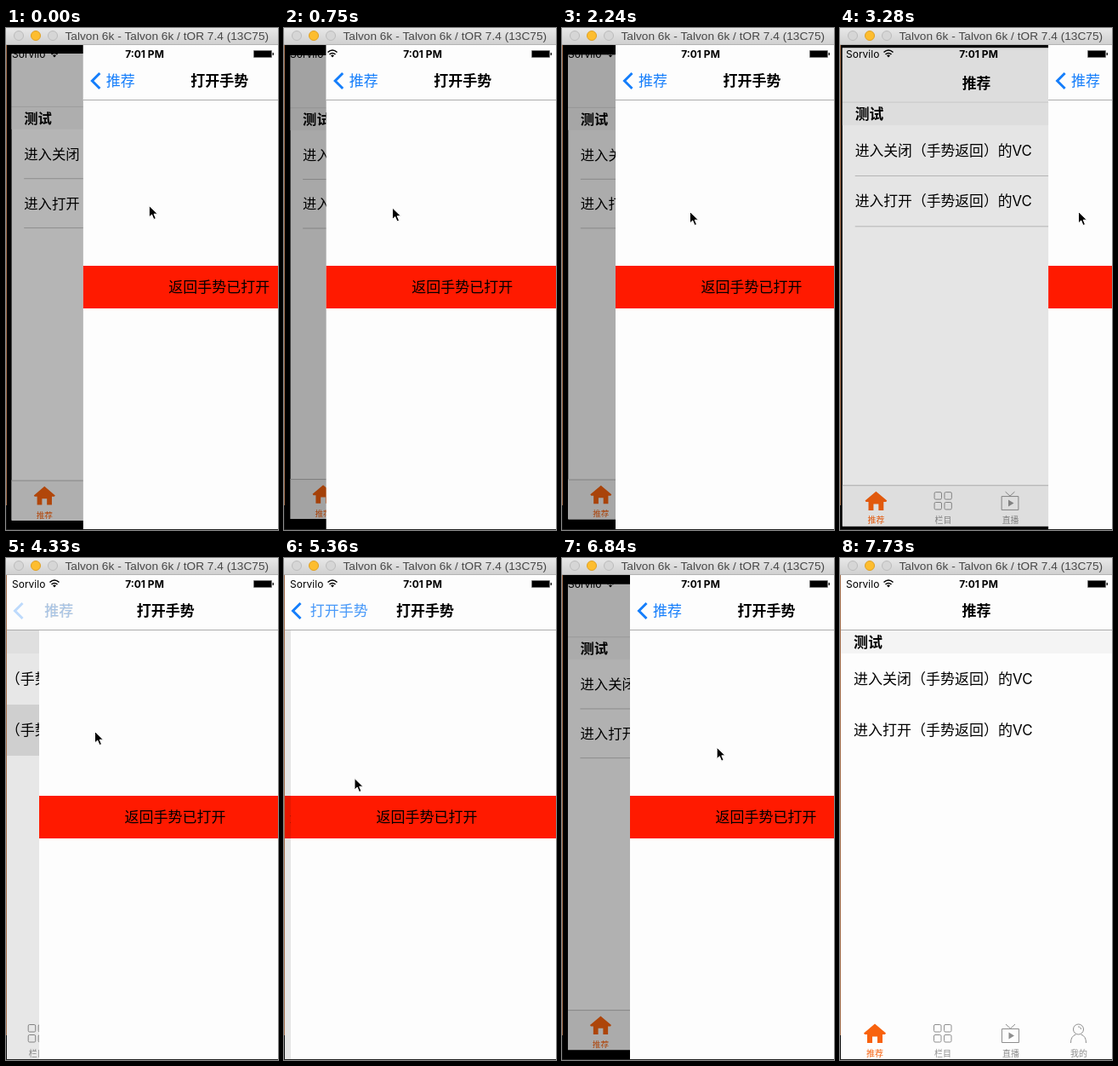
Animation of 320 by 589 pixels, one loop 8160 ms. Source, as an HTML page with a canvas:

```html
<!DOCTYPE html>
<html lang="zh">
<head>
<meta charset="utf-8">
<style>
  html, body { margin: 0; width: 100%; height: 100%; overflow: hidden; background: #fff; }
  canvas { display: block; }
</style>
</head>
<body>
<canvas width="320" height="589"></canvas>
<script>
const c = document.querySelector('canvas').getContext('2d');
const LOOP = 8160, STEP = 148.8, WIDTH = 320;
const BLUE = '#157efb', ORANGE = '#f8620e', GREY = '#8e8e8e', PAPER = '#fdfdfd';
const UI = 'Inter, "Noto Sans CJK SC", "Noto Sans CJK JP", sans-serif';
const TITLE = '"Liberation Sans", sans-serif';

const home = { title: '推荐' };
const detail = { title: '打开手势', back: '推荐' };
const nested = { title: '打开手势', back: '打开手势' };

// Motion, with time k counted in steps
const mix = (a, b, u) => a + (b - a) * u;
const ramp = (k, from, to) => Math.min(1, Math.max(0, (k - from) / (to - from)));
const wander = k => 74.7 + 25.7 * Math.cos(0.4957 * k - 5.392);
const settle = k => Math.round(200 * 0.195 ** k);

const scenes = [
  { until: 28, draw: drag, pages: [home, detail], x: k => mix(wander(k), WIDTH, ramp(k, 15, 23) ** 3) },
  { until: 34, draw: push, pages: [home, detail], x: k => settle(k - 28) },
  { until: 37, draw: push, pages: [detail, nested], x: k => settle(k - 34) },
  { until: 43, draw: drag, pages: [detail, nested], x: k => WIDTH * ramp(k, 37, 42) ** 1.87 },
  { until: 55, draw: drag, pages: [home, detail], x: k => WIDTH * ramp(k, 43, 49) ** 2 }
];

// Places the pointer passes after it stops following the wandering page
const stops = [
  { k: 15, x: 150, y: 215 }, { k: 22, x: 280, y: 215 }, { k: 26, x: 104, y: 203 },
  { k: 29, x: 104, y: 203 }, { k: 32, x: 135, y: 300 }, { k: 35, x: 135, y: 300 },
  { k: 37, x: 30, y: 216 }, { k: 41, x: 161, y: 213 }, { k: 44, x: 35, y: 215 },
  { k: 47, x: 255, y: 225 }, { k: 52, x: 276, y: 690 }
];

function pointerAt(k) {
  if (k < 15) return [wander(k) + 77 + 10 * (k / 15) ** 3, 208 + k / 2];
  const next = stops.findIndex(stop => stop.k > k);
  const b = stops.at(next), a = next < 0 ? b : stops[next - 1];
  const u = a === b ? 1 : ramp(k, a.k, b.k);
  return [mix(a.x, b.x, u), mix(a.y, b.y, u)];
}

// Drawing helpers
function box(x, y, w, h, color) {
  c.fillStyle = color;
  c.fillRect(x, y, w, h);
}

function text(str, x, midY, size, { color = '#000', weight = 400, align = 'left', font = UI } = {}) {
  c.font = `${weight} ${size}px ${font}`;
  c.textAlign = align;
  c.fillStyle = color;
  c.fillText(str, x, midY + size * 0.37);
}

function shape(d, color, width) {
  const path = new Path2D(d);
  c.fillStyle = c.strokeStyle = color;
  c.lineWidth = width || 1;
  if (width) c.stroke(path);
  else c.fill(path);
}

function dot(x, y, r, fill, stroke) {
  c.beginPath();
  c.arc(x, y, r, 0, 7);
  c.fillStyle = fill;
  c.fill();
  c.strokeStyle = stroke;
  c.lineWidth = 1;
  c.stroke();
}

function group(draw) {
  c.save();
  draw();
  c.restore();
}

const withAlpha = (alpha, draw) => group(() => { c.globalAlpha = alpha; draw(); });
const shifted = (x, y, draw) => group(() => { c.translate(x, y); draw(); });

// Pages
const navTitle = (str, x = 160.5) => text(str, x, 62, 17, { weight: 700, align: 'center' });
const chevron = () => shape('M19.5 53L10.5 62L19.5 71', BLUE, 3);

function navBar(page, shaded) {
  box(0, 20, WIDTH, 64, shaded ? '#f4f4f4' : PAPER);
  box(0, 84, WIDTH, 1, shaded ? '#d8d8d8' : '#acacac');
  navTitle(page.title);
  if (page.back) {
    chevron();
    text(page.back, 27, 62, 17, { color: BLUE });
  }
}

function gridIcon() {
  for (const x of [110.5, 122.5]) for (const y of [547.5, 559.5]) {
    c.beginPath();
    c.roundRect(x, y, 8.5, 8.5, 1.5);
    c.strokeStyle = GREY;
    c.lineWidth = 1;
    c.stroke();
  }
}

const tabIcons = [
  () => shape('M41 546.5L54 557.5L53 559H50V569H44V561.5H38V569H32V559H29L28 557.5Z', ORANGE),
  gridIcon,
  () => {
    shape('M190.5 552.5h20v16h-20zM195 547L200.5 552L206 547', GREY, 1);
    shape('M198.5 556.5L205 560.5L198.5 564.5Z', GREY);
  },
  () => shape('M286.5 553a6 6 0 1 1-12 0a6 6 0 1 1 12 0zM280 550a3 3 0 0 1 3.5 3' +
    'M271.5 569q0-8 6-10M289.5 569q0-8-6-10', GREY, 1)
];

function homeBody(shaded, pressed) {
  box(0, 85, WIDTH, 27, '#f4f4f4');
  text('测试', 16, 98.5, 17, { weight: 700 });
  if (pressed) box(0, 172, WIDTH, 60, '#e3e3e3');
  ['关闭', '打开'].forEach((word, i) => {
    text(`进入${word}（手势返回）的VC`, 16, 142 + i * 60, 17);
    if (shaded) box(16, 171.5 + i * 60, 304, 1, '#c6c6c6');
  });
  if (shaded) {
    box(0, 539, WIDTH, 49, '#f5f5f5');
    box(0, 539, WIDTH, 1, '#bdbdbd');
  }
  ['推荐', '栏目', '直播', '我的'].forEach((label, i) => {
    tabIcons[i]();
    text(label, 41 + i * 80, 581, 10, { color: i ? GREY : ORANGE, align: 'center' });
  });
}

function detailBody() {
  box(0, 279, WIDTH, 50, '#ff1a00');
  text('返回手势已打开', 160, 304, 17, { align: 'center' });
}

function drawPage(page, { shaded = false, pressed = false } = {}) {
  box(0, 20, WIDTH, 568, PAPER);
  if (page === home) homeBody(shaded, pressed);
  else detailBody();
  navBar(page, shaded);
}

const dim = alpha => box(0, 20, WIDTH, 568, `rgba(0,0,0,${alpha})`);

// The lower page grows and brightens while the upper one is pulled off it
function drag([lower, upper], x, pressed) {
  const open = x / WIDTH, scale = mix(0.95, 1, open);
  box(0, 20, WIDTH, 568, '#000');
  group(() => {
    c.translate(160.5, 304);
    c.scale(scale, scale);
    c.translate(-160.5, -304);
    c.beginPath();
    c.rect(1, 20, 319, 568);
    c.clip();
    drawPage(lower, { shaded: open < 1, pressed });
    dim(0.4 * (1 - open));
  });
  shifted(x, 0, () => drawPage(upper));
}

// The upper page slides in and the old title turns into the back label
function push([lower, upper], x) {
  const p = 1 - x / WIDTH, fade = p ** 10, labelX = 27 + 0.47 * x;
  shifted(-96 * p, 0, () => drawPage(lower, { pressed: true }));
  dim(0.1 * p);
  shifted(x, 0, () => drawPage(upper));

  box(0, 20, WIDTH, 64, PAPER);
  box(0, 84, WIDTH, 1, '#acacac');
  navTitle(upper.title, 160.5 + 0.7 * x);
  withAlpha(lower.back ? 1 : fade, chevron);
  withAlpha(1 - p, () => text(lower.title, labelX, 62, 17, { weight: 700 }));
  withAlpha(fade, () => text(upper.back, labelX, 62, 17, { color: BLUE }));
}

function statusBar() {
  text('Sorvilo', 7, 30.5, 12);
  shape('M51.5 28.5q5.5-5 11 0M53.5 31q3.5-3 7 0', '#000', 1.6);
  shape('M57 34.5l-2-2.2q2-1.5 4 0z', '#000');
  text('7:01 PM', 163, 30.5, 12, { weight: 700, align: 'center' });
  shape('M291.5 26.5h21v8h-21z', '#777', 1);
  box(292, 27, 20, 7, '#000');
  box(313.5, 29, 1.5, 3, '#222');
}

function windowFrame() {
  const bar = c.createLinearGradient(0, 0, 0, 20);
  bar.addColorStop(0, '#e8e8e8');
  bar.addColorStop(1, '#cfcfcf');
  box(0, 0, WIDTH, 20, bar);
  box(0, 19, WIDTH, 1, '#b4b4b4');
  [15, 35, 55].forEach((x, i) =>
    dot(x, 9, 5.5, ...(i === 1 ? ['#fdbd2f', '#dfa023'] : ['#d6d6d6', '#bcbcbc'])));
  text('Talvon 6k - Talvon 6k / tOR 7.4 (13C75)', 69.5, 9, 13.7, { color: '#484848', font: TITLE });
  box(0, 20, 1, 540, '#a5714f');
  box(0, 560, 1, 29, '#111');
  box(0, 588, WIDTH, 1, '#222');
}

function cursor() {
  const arrow = 'M.5 .5V14L3.7 11L6 16.5L8.5 15.5L6.2 10.2H10.5Z';
  shape(arrow, '#000');
  shape(arrow, '#fff', 1);
}

function draw() {
  const k = Math.floor((performance.now() % LOOP + 12) / STEP) % 55;
  const scene = scenes.find(s => k < s.until);
  scene.draw(scene.pages, scene.x(k), k === 26 || k === 27);
  statusBar();
  windowFrame();
  shifted(...pointerAt(k), cursor);
  requestAnimationFrame(draw);
}
draw();
</script>
</body>
</html>
```
